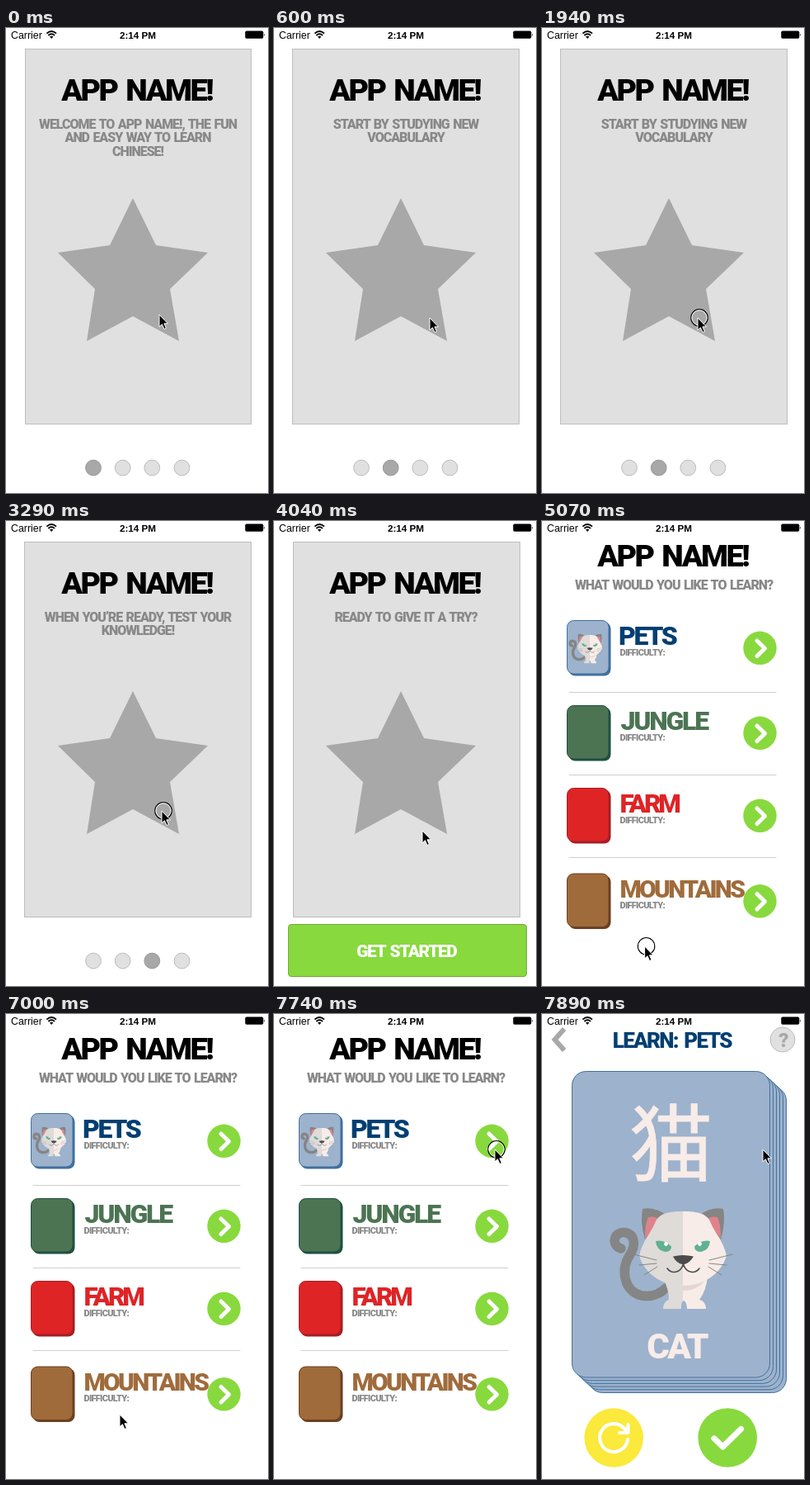
An HTML page for the animation above (8000 ms loop, 318x563 px).

```html
<!DOCTYPE html>
<html lang="en">
<head>
<meta charset="utf-8">
<title>App intro</title>
<style>
html, body { margin: 0; width: 100%; height: 100%; overflow: hidden; background: #fff; }
svg { display: block; width: 318px; height: 563px; }
.display { font-family: Roboto, sans-serif; font-weight: 900; letter-spacing: -.065em; word-spacing: .1em; }
.status { font-family: "Liberation Sans", Arial, sans-serif; }
.hanzi { font-family: "Noto Sans CJK SC", "Noto Sans CJK JP", "Noto Sans CJK", sans-serif; font-weight: 500; }
.line { fill: none; stroke-linecap: round; stroke-linejoin: round; }
</style>
</head>
<body>
<svg id="stage" viewBox="0 0 318 563" xmlns="http://www.w3.org/2000/svg">
  <rect width="318" height="563" fill="#fff"/>
  <g id="screens"></g>
  <g id="bar">
    <text class="status" x="6" y="12.5" font-size="12.4">Carrier</text>
    <text class="status" x="160" y="12.5" font-size="11.7" font-weight="700" text-anchor="middle">2:14 PM</text>
    <g class="line" stroke="#000" stroke-width="1.9" style="stroke-linecap:butt">
      <path d="M49.4 6.6Q55.2 1.6 61 6.6M51.4 9Q55.2 5.6 59 9"/>
    </g>
    <path d="M53 10.6Q55.2 8.8 57.4 10.6L55.2 13Z"/>
    <rect x="290.3" y="3.4" width="22" height="9.4" rx="1.8"/>
    <path d="M313 6.5Q314.6 8.2 313 10Z"/>
  </g>
  <g id="pointer">
    <g id="ring" fill="none">
      <circle cx="2" cy="-.2" r="10.2" stroke="#000" stroke-width="1.2"/>
      <circle cx="2" cy="-.2" r="9.1" stroke="#fff" stroke-width="1"/>
    </g>
    <path d="M0 0V14.8L3.4 11.7L6 17.5L8.4 16.4L5.9 10.8H10.5Z" stroke="#fff" stroke-width="1" stroke-linejoin="round"/>
  </g>
</svg>
<script>
const LOOP = 8000;
const GREY = '#a8a8a8', PALE = '#e0e0e0', TEXT = '#888', GREEN = '#88d93d', NAVY = '#003f72';
const BLUE = '#9db2cc', EDGE = '#40709f', CREAM = '#f8ece8';

const label = (text, x, y, size, fill, anchor = 'middle', extra = '') =>
  `<text class="display" x="${x}" y="${y}" font-size="${size}" fill="${fill}" text-anchor="${anchor}" ${extra}>${text}</text>`;
const disc = (x, y, r, fill, stroke = 'none') =>
  `<circle cx="${x}" cy="${y}" r="${r}" fill="${fill}" stroke="${stroke}"/>`;
const box = (x, y, w, h, r, fill, stroke = 'none') =>
  `<rect x="${x}" y="${y}" width="${w}" height="${h}" rx="${r}" fill="${fill}" stroke="${stroke}"/>`;
const line = (d, stroke, width) => `<path class="line" d="${d}" stroke="${stroke}" stroke-width="${width}"/>`;
const shape = (d, fill) => `<path d="${d}" fill="${fill}"/>`;
const title = y => label('APP NAME!', 158.7, y, 37.7, '#000');

const star = shape('M154 206L182 263L245 272L199 316L210 379L154 349L98 379L108 316L63 272L126 263Z', GREY);

function intro(step, x, w, lines) {
  const dots = [106, 141.7, 177.3, 213.5].map((cx, i) =>
    disc(cx, 532.5, 9.4, i === step ? GREY : PALE, i === step ? '#989898' : '#bcbcbc')).join('');
  const button = box(17.5, 488.5, 289, 63, 3.5, GREEN, '#6cac35') +
    label('GET STARTED', 160.8, 527.7, 20.8, '#fff');
  return box(x, 25.5, w, 454, 0, PALE, '#bdbdbd') + title(88.2) +
    lines.map((s, i) => label(s, 160, 121.7 + 16.7 * i, 16, TEXT)).join('') +
    star + (step < 3 ? dots : button);
}

function cat() {
  const mirror = s => `<g transform="translate(342 0) scale(-1 1)">${s}</g>`;
  const ear = shape('M122 236Q136 233 150 243L125 273Q119 253 122 236Z', '#858585') +
    shape('M129 246Q138 244 143 250L125 272Q125 255 129 246Z', '#e0828c');
  const head = 'M171 239C154 239 143 241 138 251C133 264 121 276 118 293C126 317 148 329 171 329Z';
  const leg = 'M171 320V348C169 349 169 353 169 357H147C147 351 150 347 154 346Q154 334 148 322Z';
  const eye = shape('M138 275Q149 273 157 281.5Q157 288.5 149 288Q139 286 138 275Z', '#62b092');
  const whiskers = line('M139 298L111 291M139 302L118 304M140 306L124 316', '#858585', 1);
  return line('M96 284C83 280 87 263 101 264.5C113 267 114 280 107 291C95 309 99 336 121 341C133 343 142 340 150 332', '#858585', 11.5) +
    shape(leg, '#dfdbd9') + shape('M171 318V347C174 347 176 351 176 357H199C199 351 196 347 191 346Q200 334 201 316Z', CREAM) +
    shape('M171 326L201 318Q191 335 171 335Z', '#e4d7d3') +
    ear + mirror(ear) + shape(head, '#dfdbd9') + mirror(shape(head, CREAM)) +
    eye + mirror(eye) + disc(150.5, 278.5, 2.4, '#fff') + disc(191.5, 278.5, 2.4, '#fff') +
    whiskers + mirror(whiskers) +
    shape('M159 293.5Q171 290.5 184 293.5Q179 302 171.5 303.5Q163 302 159 293.5Z', '#4b4b4b') +
    line('M152 308C157 315 168 314 171.5 303C175 314 186 315 191 308', '#4b4b4b', 1.6);
}

function topic(name, y, fill, dark, ink, x, size, spacing) {
  return box(32.5, y + 2.5, 51, 65, 8, dark) + box(30.5, y + .5, 50.5, 64.5, 8, fill, dark) +
    label(name, x, y + 29.7, size, ink, 'start', `style="letter-spacing:${spacing}em"`) +
    label('DIFFICULTY:', 94.5, y + 42.6, 11, TEXT, 'start') +
    disc(264.5, y + 33.8, 20.2, GREEN) +
    line(`M261 ${y + 25}L270.5 ${y + 34.2}L261 ${y + 43.5}`, '#fff', 5);
}

function menu() {
  return title(54.6) + label('WHAT WOULD YOU LIKE TO LEARN?', 160, 82.7, 16, TEXT) +
    [207.5, 307.5, 407.5].map(y => line(`M33 ${y}H284`, '#cfcfcf', 1)).join('') +
    topic('PETS', 120, BLUE, EDGE, NAVY, 93, 32, -.075) +
    `<g transform="translate(8.4 68.6) scale(.29)">${cat()}</g>` +
    topic('JUNGLE', 223, '#4c7453', '#1f5040', '#4c7453', 95.5, 32, -.07) +
    topic('FARM', 323, '#df2426', '#a51f24', '#df2426', 94.5, 31.5, -.1) +
    topic('MOUNTAINS', 426.5, '#a06b3b', '#6b4022', '#a06b3b', 94.5, 30, -.09);
}

function lesson() {
  let cards = '';
  for (let i = 5; i >= 0; i--) cards += box(36.5 + 4 * i, 69.5 + 3.7 * i, 240, 370.5, 17, BLUE, EDGE);
  return '<path d="M27 18L15.5 31L27 44" fill="none" stroke="#a8a8a8" stroke-width="6"/>' +
    label('LEARN: PETS', 157.8, 40.7, 26, NAVY) +
    disc(292, 31, 15, PALE, '#bdbdbd') + label('?', 292.5, 39.5, 24, GREY) + cards +
    `<text class="hanzi" lang="zh" x="156.8" y="195.2" font-size="102" fill="${CREAM}" stroke="${CREAM}" stroke-width=".8" text-anchor="middle">猫</text>` +
    cat() + label('CAT', 163.5, 417, 42.3, CREAM) +
    disc(87.2, 513, 35.8, '#fbe93c') +
    line('M104 515A17 17 0 1 1 99 501L104 506M104.5 497V507H94', '#fff', 4.1) +
    disc(225.2, 513, 35.8, GREEN) + line('M209 514L219.5 524L241.5 502.5', '#fff', 7.2);
}

const screens = [
  [0, intro(0, 23.5, 274, ['WELCOME TO APP NAME!, THE FUN', 'AND EASY WAY TO LEARN', 'CHINESE!'])],
  [600, intro(1, 22.5, 275, ['START BY STUDYING NEW', 'VOCABULARY'])],
  [2090, intro(2, 22.5, 275, ['WHEN YOU’RE READY, TEST YOUR', 'KNOWLEDGE!'])],
  [3440, intro(3, 23.5, 275, ['READY TO GIVE IT A TRY?'])],
  [5070, menu()],
  [7890, lesson()]
];
const presses = [[450, 600], [1940, 2090], [3290, 3440], [5070, 5210], [7740, 7890]];
// The pointer jumps from stop to stop: time, x, y
const stops = [
  [0, 186, 347], [150, 187, 349], [300, 189, 351],
  [4040, 180, 375], [4180, 158, 440], [4330, 135, 500], [4470, 128, 517],
  [4770, 126, 516], [4920, 124.6, 515], [5510, 128, 515], [5650, 125, 514],
  [5950, 127, 510], [6100, 131, 504], [6250, 135, 498], [6400, 138, 494],
  [7000, 138, 485], [7150, 152, 440], [7300, 195, 340], [7450, 245, 225], [7600, 268, 164]
];

const $ = id => document.getElementById(id);
$('screens').innerHTML = screens.map(s => `<g>${s[1]}</g>`).join('');
const views = [...$('screens').children];
const indexAt = (list, t) => list.reduce((last, item, i) => item[0] <= t ? i : last, 0);

function draw(t) {
  const current = indexAt(screens, t);
  views.forEach((view, i) => view.setAttribute('display', i === current ? 'inline' : 'none'));
  const [, x, y] = stops[indexAt(stops, t)];
  $('pointer').setAttribute('transform', `translate(${x} ${y})`);
  const pressed = presses.some(([from, to]) => t >= from && t < to);
  $('ring').setAttribute('display', pressed ? 'inline' : 'none');
}

const start = performance.now();
function tick() {
  draw((performance.now() - start) % LOOP);
  requestAnimationFrame(tick);
}
tick();
</script>
</body>
</html>
```
